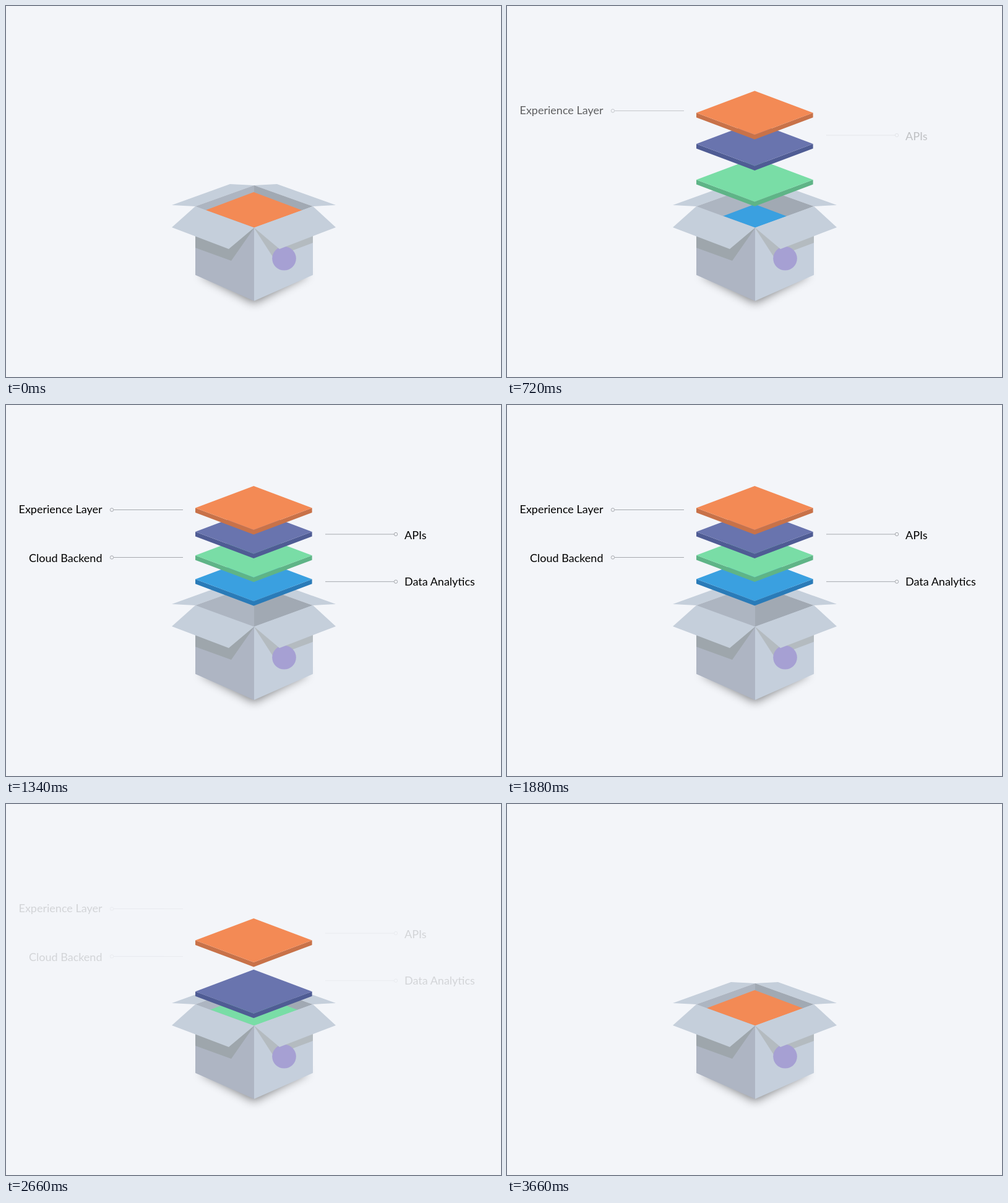
Animation, 800 px wide and 600 px high, one loop 3.68 s. Source, as an HTML page:

```html
<!DOCTYPE html>
<html lang="en">
<head>
<meta charset="utf-8">
<title>Layers rising from a box</title>
<style>
  html, body { margin: 0; width: 100%; height: 100%; overflow: hidden; background: #f3f5f9; }
  svg { display: block; }
  text { font: 18px Lato, sans-serif; fill: #000; }
  .label line, .label circle { stroke: #a6a9ae; fill: none; }
</style>
</head>
<body>
<svg width="800" height="600" viewBox="0 0 800 600">
  <defs>
    <filter id="blur" x="-30%" y="-50%" width="160%" height="200%">
      <feGaussianBlur stdDeviation="8"/>
    </filter>
  </defs>

  <polygon points="314,434 401,398 488,434 401,480" opacity=".5" filter="url(#blur)"/>

  <!-- back flaps and inner walls -->
  <g fill="#c5cfdb">
    <polygon points="306,324 268,322 362,288 401,290"/>
    <polygon points="496,324 533,322 438,288 401,290"/>
  </g>
  <polygon points="306,324 401,290 401,360" fill="#adb5c1"/>
  <polygon points="496,324 401,290 401,360" fill="#a1a9b3"/>

  <g id="slabs"></g>

  <!-- front faces, flap shadows, front flaps -->
  <polygon points="306,324 401,358.5 401,477 306,435" fill="#aeb5c3"/>
  <polygon points="496,324 401,358.5 401,477 496,435" fill="#c5cfdc"/>
  <polygon points="306,370 401,359 364,412 306,391" fill="#9ea6ac"/>
  <polygon points="496,370 401,359 432,407 496,383" fill="#b4bbc0"/>
  <circle cx="449.5" cy="408.3" r="19.3" fill="#a6a0d3"/>
  <g fill="#c5cfdb">
    <polygon points="306,324 401,358.5 360,393 268,358"/>
    <polygon points="496,324 401,358.5 442,393 533,358"/>
  </g>

  <g id="labels"></g>
</svg>
<script>
const LOOP = 3680, MOVE = 800;
const RISE = 342, RISE_STEP = 115, FALL = 2617, FALL_STEP = 50;
const FADE_IN = 545, FADE_IN_TIME = 290, FADE_OUT = 2400, FADE_OUT_TIME = 300;

// Top to bottom; rest and up are the heights of the far corner.
const layers = [
  { top: '#f38a55', side: '#c87249', rest: 301, up: 131, text: 'Experience Layer', line: 169.5, base: 174.6 },
  { top: '#6974ae', side: '#4f5c94', rest: 346, up: 169.5, text: 'APIs', line: 209, base: 216.6 },
  { top: '#79dda6', side: '#5fb487', rest: 346, up: 207.5, text: 'Cloud Backend', line: 246.5, base: 254.4 },
  { top: '#3aa0e0', side: '#2a7bb8', rest: 346, up: 246, text: 'Data Analytics', line: 285.7, base: 291.6 },
];

const clamp = v => Math.min(1, Math.max(0, v));
const easeOutExpo = u => u >= 1 ? 1 : 1 - 2 ** (-10 * u);
const progress = (t, start, time) => clamp((t - start) / time);

function addGroup(parent, markup) {
  const group = document.createElementNS('http://www.w3.org/2000/svg', 'g');
  group.innerHTML = markup;
  parent.append(group);
  return group;
}

const slabs = document.getElementById('slabs');
const labels = document.getElementById('labels');

for (const layer of [...layers].reverse()) {
  layer.slab = addGroup(slabs, `
    <path d="M306 35.5V43L400.3 78.5L494.6 43V35.5L400.3 71Z" fill="${layer.side}"/>
    <path d="M400.3 0L494.6 35.5L400.3 71L306 35.5Z" fill="${layer.top}"/>`);
}

layers.forEach((layer, i) => {
  const left = i % 2 === 0;
  const [dot, from, to, x] = left ? [171, 174, 286, 155.5] : [630, 516, 627, 644];
  layer.label = addGroup(labels, `
    <line x1="${from}" x2="${to}" y1="${layer.line}" y2="${layer.line}"/>
    <circle cx="${dot}" cy="${layer.line}" r="2.7"/>
    <text x="${x}" y="${layer.base}" text-anchor="${left ? 'end' : 'start'}">${layer.text}</text>`);
  layer.label.setAttribute('class', 'label');
});

function draw(t) {
  const fadeOut = progress(t, FADE_OUT, FADE_OUT_TIME);
  layers.forEach((layer, i) => {
    const rise = easeOutExpo(progress(t, RISE + i * RISE_STEP, MOVE));
    const fall = easeOutExpo(progress(t, FALL - i * FALL_STEP, MOVE));
    const y = layer.rest + (layer.up - layer.rest) * (rise - fall);
    layer.slab.setAttribute('transform', `translate(0 ${y})`);
    layer.label.setAttribute('opacity', progress(t, FADE_IN + i * RISE_STEP, FADE_IN_TIME) * (1 - fadeOut));
  });
}

function tick() {
  draw(performance.now() % LOOP);
  requestAnimationFrame(tick);
}
tick();
</script>
</body>
</html>
```
